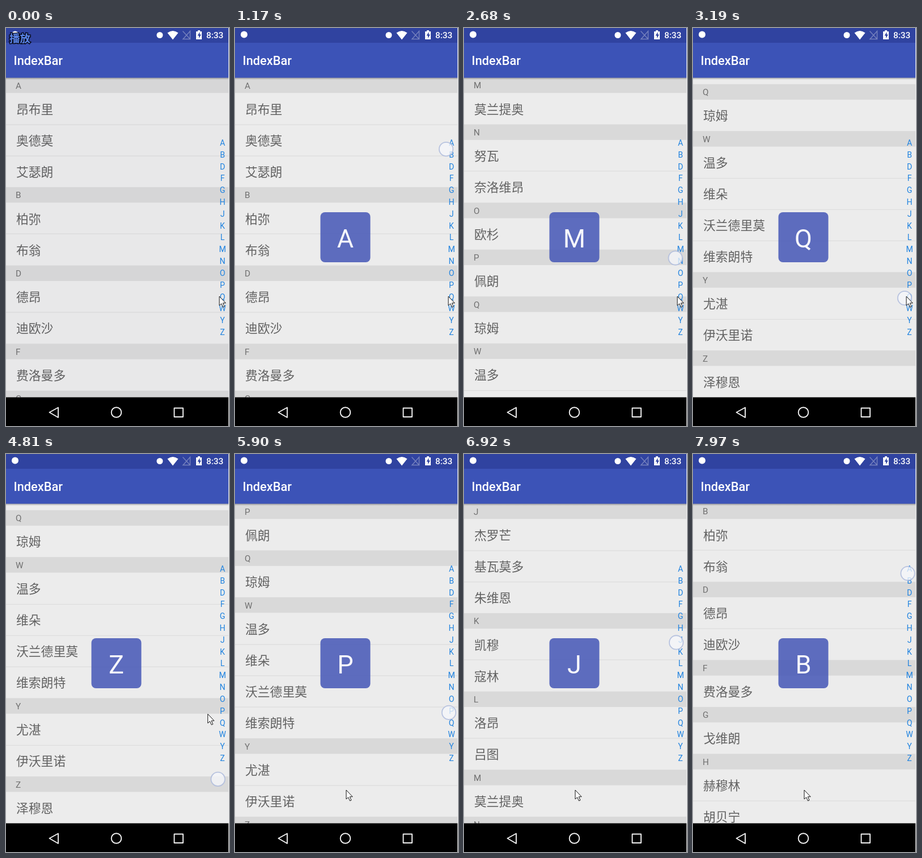
An HTML page that plays this animation: 393x700 px, repeating every 8 s.

```html
<!DOCTYPE html>
<html lang="zh-CN">
<head>
<meta charset="utf-8">
<title>IndexBar</title>
<style>
html, body { margin: 0; height: 100%; overflow: hidden; background: #ececec; }
svg { display: block; width: 393px; height: 700px; }
text { font-family: Roboto, "Noto Sans CJK SC", "Noto Sans CJK", sans-serif; }
.name { font: 21.8px "Noto Sans CJK SC", "Noto Sans CJK", sans-serif; fill: #626262; }
.head { font-size: 15.3px; fill: #707070; }
.key { font-size: 14px; fill: #1e82e0; text-anchor: middle; }
</style>
</head>
<body>
<svg viewBox="0 0 393 700">
  <defs>
    <linearGradient id="shade" x2="0" y2="1">
      <stop stop-color="#000" stop-opacity=".32"/>
      <stop offset="1" stop-color="#000" stop-opacity="0"/>
    </linearGradient>
  </defs>
  <rect width="393" height="700" fill="#ececec"/>
  <g id="list"></g>
  <rect id="dim" y="87" width="393" height="563" fill="#000040" opacity=".015"/>
  <rect y="87" width="393" height="4" fill="url(#shade)"/>
  <g id="keys"></g>

  <g id="popup">
    <rect x="150.5" y="324" width="88" height="88" rx="8" fill="#3f51b5" opacity=".82"/>
    <text id="letter" x="194.5" y="386" font-size="45" fill="#f8f8fc" text-anchor="middle"></text>
  </g>
  <circle id="touch" r="12.2" fill="#f6f7fb" fill-opacity=".75" stroke="#aebbdc" stroke-opacity=".85" stroke-width="1.8"/>

  <rect width="393" height="26" fill="#3043a0"/>
  <rect y="26" width="393" height="61.5" fill="#3c53b7"/>
  <text x="13.5" y="65" font-size="21.8" font-weight="500" fill="#fff">IndexBar</text>
  <g fill="#fff">
    <circle cx="16" cy="11.5" r="6"/>
    <circle cx="271" cy="12.5" r="5.5"/>
    <path d="M284.5 8.5Q294 1.5 303.500 8.500L294 20.500Z"/>
    <path d="M335 6h3v-2h4v2h3v14h-10z"/>
    <text x="353" y="18" font-size="15.3" font-weight="500">8:33</text>
  </g>
  <path d="M341.500 7l-4 6.500h2.500v4.500l4-6.500h-2.500z" fill="#3043a0"/>
  <path d="M312 19.500L324.500 5.500V19.500ZM311.500 5.500L325 20" fill="none" stroke="#7480bd" stroke-width="1.500"/>
  <text id="play" x="6" y="25" font-size="18.500" font-weight="700" fill="#5b86ea" stroke="#0a0d20" stroke-width="3" paint-order="stroke">播放</text>

  <rect y="649.500" width="393" height="51" fill="#000"/>
  <g fill="none" stroke="#f2f2f2" stroke-width="1.900" stroke-linejoin="round">
    <path d="M76.500 676L92 667.500V685Z"/>
    <circle cx="194.500" cy="676" r="8.800"/>
    <rect x="296.500" y="668.500" width="15.500" height="15.500"/>
  </g>
  <rect x="392" width="1" height="700" fill="#f4f4f4"/>
  <path id="mouse" d="M0 0V16L3.700 12.800L6.500 19L9 17.900L6.300 11.800H11.200Z" fill="#fff" stroke="#111"/>
</svg>
<script>
const groups = {
  A: '昂布里 奥德莫 艾瑟朗', B: '柏弥 布翁', D: '德昂 迪欧沙', F: '费洛曼多', G: '戈维朗',
  H: '赫穆林 胡贝宁', J: '杰罗芒 基瓦莫多 朱维恩', K: '凯穆 寇林', L: '洛昂 吕图',
  M: '莫兰提奥', N: '努瓦 奈洛维昂', O: '欧杉', P: '佩朗', Q: '琼姆',
  W: '温多 维朵 沃兰德里莫 维索朗特', Y: '尤湛 伊沃里诺', Z: '泽穆恩'
};
const letters = Object.keys(groups);
const LOOP = 8000, TOP = 87, BOTTOM = 649.6, HEAD = 27.3, ROW = 55.2, PITCH = 20.81;
const $ = id => document.getElementById(id);
const show = (id, on) => $(id).style.display = on ? '' : 'none';
const move = (id, x, y) => $(id).setAttribute('transform', `translate(${x} ${y})`);

const offsets = [];
let height = 0, list = '', keys = '';
letters.forEach((key, i) => {
  offsets.push(height);
  list += `<rect y="${height}" width="393" height="${HEAD}" fill="#d9d9d9"/>
    <text class="head" x="17" y="${height + 19.5}">${key}</text>`;
  height += HEAD;
  groups[key].split(' ').forEach((name, row) => {
    if (row) list += `<rect y="${Math.round(height) - 0.5}" width="393" height="1" fill="#dadada"/>`;
    list += `<text class="name" x="18" y="${height + 36.3}">${name}</text>`;
    height += ROW;
  });
  keys += `<text class="key" x="381.5" y="${207 + i * PITCH}">${key}</text>`;
});
$('list').innerHTML = list;
$('keys').innerHTML = keys;

// Tracks hold [time, x, y], joined by straight lines.
const finger = [
  [1020, 372, 196], [2020, 372, 318], [3190, 373, 475], [4130, 374, 600], [4575, 374, 600],
  [4810, 373.5, 573], [6500, 379, 384], [6920, 374, 331], [7970, 378.5, 210]
];
const pointer = [[4550, 376, 472], [4810, 357, 456], [5220, 302, 510], [5760, 196, 591]];

function along(track, t) {
  const i = track.findIndex(p => p[0] > t);
  if (i === 0) return track[0].slice(1);
  if (i < 0) return track[track.length - 1].slice(1);
  const [a, b] = [track[i - 1], track[i]];
  const k = (t - a[0]) / (b[0] - a[0]);
  return [a[1] + (b[1] - a[1]) * k, a[2] + (b[2] - a[2]) * k];
}

// The screen refreshes in steps: [start, step length].
const rates = [[1020, 140], [2140, 131.25], [3190, 136.25], [4280, 135], [5360, 126.67], [6500, 138.75], [7610, 120]];
function hold(t) {
  const rate = rates.filter(r => r[0] <= t).pop();
  return rate ? rate[0] + Math.floor((t - rate[0] + 15) / rate[1]) * rate[1] : t;
}

function draw(now) {
  const time = now % LOOP, t = hold(time), touching = time >= 1020;
  show('play', time < 150);
  show('dim', time < 430);
  show('popup', touching);
  show('touch', touching);
  // The selection trails the finger slightly.
  const y = along(finger, t - 40)[1];
  const index = Math.max(0, Math.min(letters.length - 1, Math.floor((y - 191.6) / PITCH)));
  const scroll = touching ? Math.min(offsets[index], height - (BOTTOM - TOP)) : 0;
  $('letter').textContent = letters[index];
  move('list', 0, TOP - scroll);
  move('touch', ...along(finger, t));
  move('mouse', ...along(pointer, t));
  requestAnimationFrame(draw);
}
requestAnimationFrame(draw);
</script>
</body>
</html>
```
